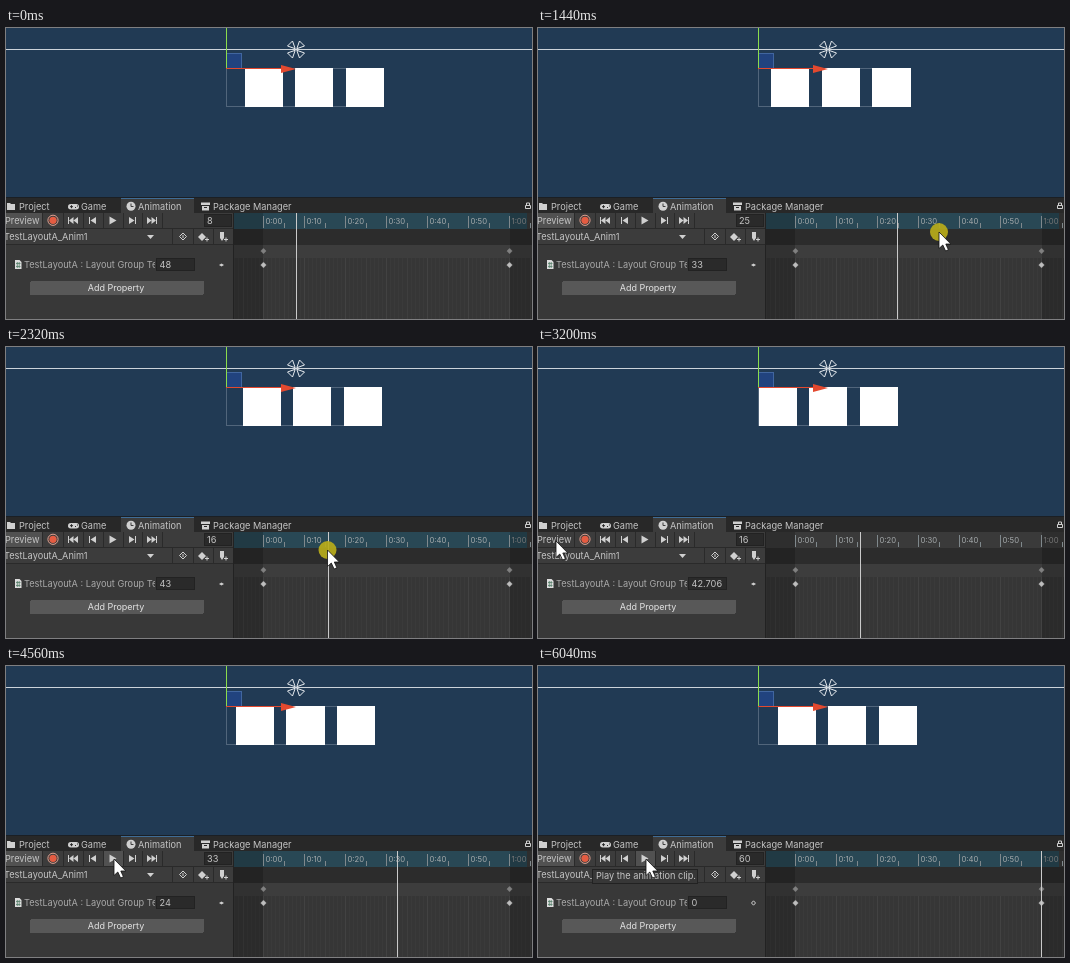
An HTML page for the animation above (6.12 s loop, 526 by 291 pixels).

```html
<!DOCTYPE html>
<html lang="en">
<head>
<meta charset="utf-8">
<title>Layout animation</title>
<style>
html, body { margin: 0; width: 100%; height: 100%; overflow: hidden; background: #213a54; }
svg { display: block; }
text { font: 9.2px Inter, Roboto, sans-serif; fill: #c4c4c4; white-space: pre; }
rect, .crisp { shape-rendering: crispEdges; }
.dim { fill: #a9a9a9; }
.ruler text { font-size: 7.7px; fill: #a6abad; }
.icon { fill: #d0d0d0; }
.line { fill: none; stroke: #d0d0d0; }
.field { fill: #2a2a2a; stroke: #222; }
</style>
</head>
<body>
<svg width="526" height="291" viewBox="0 0 526 291">
  <!-- scene view -->
  <rect width="526" height="170" fill="#213a54"/>
  <rect y="21" width="526" height="1" fill="#ccd3da"/>
  <rect id="outline" x="220.5" y="40.5" width="158" height="38" fill="none" stroke="#51657b"/>
  <g id="cubes" fill="#fff"></g>
  <rect x="220.5" y="25.5" width="15" height="15" fill="#21437f" stroke="#41669f"/>
  <rect x="220" width="1" height="41" fill="#8bdc4c"/>
  <rect x="220" y="40" width="57" height="1" fill="#e3492f"/>
  <path d="M275 37L290 41L275 45Z" fill="#e3492f"/>
  <g id="anchor" transform="translate(290 21.5)" fill="none" stroke="#e8ecf0"></g>

  <!-- tabs -->
  <rect y="169" width="526" height="122" fill="#383838"/>
  <rect y="169" width="526" height="16" fill="#282828"/>
  <rect y="169" width="526" height="1" fill="#1b1f24"/>
  <rect x="115" y="170" width="73" height="16" fill="#3c3c3c"/>
  <rect x="115" y="170" width="73" height="1" fill="#3f6c96"/>
  <path class="icon" d="M1 175h3l1 1h4v6H1z"/>
  <text x="13" y="181.5">Project</text>
  <rect class="icon" x="62" y="176" width="11" height="5.5" rx="2.7" style="shape-rendering:auto"/>
  <path d="M64 178.7h3M65.5 177.2v3M69 179.5h1M71 178h1" stroke="#282828"/>
  <text x="75" y="181.5">Game</text>
  <circle class="icon" cx="125" cy="178.3" r="4.5"/>
  <path d="M125 175.5v3h2.5" fill="none" stroke="#3c3c3c"/>
  <text x="132" y="181.5">Animation</text>
  <path class="icon" d="M195 174.5h9v2.5h-9zM196 178h7v4.5h-7z"/>
  <path d="M198 179.5h3" stroke="#282828"/>
  <text x="207" y="181.5">Package Manager</text>
  <path class="line" d="M519.5 177.5h5v3h-5zM520.5 177v-2h3v2"/>

  <!-- transport bar -->
  <rect y="185" width="228" height="31" fill="#3c3c3c"/>
  <rect id="previewBtn" y="185" width="36" height="15" fill="#515151"/>
  <rect id="playBtn" x="97" y="185" width="20" height="15" fill="#515151"/>
  <text x="-1" y="196">Preview</text>
  <circle cx="47" cy="192.3" r="5.1" fill="none" stroke="#e0a090"/>
  <circle cx="47" cy="192.3" r="3.6" fill="#e45c42"/>
  <g class="icon">
    <path d="M62 189h1v7h-1zM67.5 189v7l-4.500-3.500zM72 189v7l-4.500-3.500z"/>
    <path d="M83 189h1v7h-1zM90 189v7l-5.500-3.500z"/>
    <path d="M103.500 188.500v8l7-4z"/>
    <path d="M123 189v7l5.500-3.500zM129 189h1v7h-1z"/>
    <path d="M141 189v7l4.500-3.500zM145.500 189v7l4.500-3.500zM150 189h1v7h-1z"/>
  </g>
  <path class="crisp" d="M36.500 185v15M57.500 185v15M77.500 185v15M97.500 185v15M117.500 185v15M136.500 185v15M156.500 185v15M166.500 201v15M187.500 201v15M207.500 201v15M0 200.500h228M0 216.500h228" stroke="#2a2a2a"/>
  <rect class="field" x="198.500" y="186.500" width="27" height="12"/>
  <text id="frameLabel" x="201" y="195.500"></text>
  <text x="-2" y="212">TestLayoutA_Anim1</text>
  <path class="icon" d="M141 207h7l-3.500 4z"/>
  <path class="line" d="M177 205l3.500 3.500l-3.500 3.500l-3.500-3.500zM177 207v3"/>
  <path class="icon" d="M196 205l4 4l-4 4l-4-4zM214 204h4v6l-2 3l-2-3z"/>
  <path class="line" d="M199 211.500h4M201 209.500v4M218 211.500h4M220 209.500v4"/>

  <!-- property list -->
  <path d="M9 232h4.500l2 2v7H9z" fill="#dedede"/>
  <path d="M10 235.500h4.500M10 238.500h4.500M11.300 234v6M13.200 234v6" stroke="#56806a" stroke-width=".8"/>
  <svg width="149" height="291"><text class="dim" x="18" y="240">TestLayoutA : Layout Group Te</text></svg>
  <rect class="field" x="150.500" y="230.500" width="38" height="12"/>
  <text id="valueLabel" x="153.500" y="240"></text>
  <path id="keyDot" class="icon" d="M213 237l2.500-1.500l2.500 1.500l-2.500 1.500z"/>
  <path id="keyHere" class="line" d="M215.500 234.800l2 2.200l-2 2.200l-2-2.200z"/>
  <rect x="24" y="253" width="174" height="14" rx="2" fill="#585858"/>
  <text x="110" y="263.300" text-anchor="middle" style="fill:#e2e2e2;font-size:9px">Add Property</text>

  <!-- dope sheet -->
  <rect x="228" y="185" width="298" height="106" fill="#363636"/>
  <rect x="228" y="185" width="298" height="16" fill="#3a3a3a"/>
  <rect id="tint" x="228" y="185" width="293" height="16" fill="#294855"/>
  <rect x="228" y="201" width="298" height="16" fill="#2c2c2c"/>
  <rect x="228" y="217" width="298" height="13" fill="#3d3d3d"/>
  <g id="grid" class="crisp"></g>
  <rect x="228" y="185" width="29" height="106" fill="#000" opacity=".2"/>
  <rect x="504" y="185" width="22" height="106" fill="#000" opacity=".2"/>
  <rect x="227" y="185" width="1" height="106" fill="#222"/>
  <g id="ruler" class="ruler"></g>
  <g id="keys"></g>
  <rect id="playhead" y="185" width="1" height="106" fill="#cacaca"/>

  <g id="tooltip">
    <rect x="54.500" y="203.500" width="105" height="14" fill="#373737" stroke="#222"/>
    <text x="58" y="213">Play the animation clip.</text>
  </g>
  <g id="cursor">
    <circle id="press" r="9" fill="#b8ac1a" opacity=".92"/>
    <path d="M0 0V16.500L3.800 13L6.600 19L9.400 17.800L6.800 12H11.800Z" fill="#fff" stroke="#111" stroke-width=".8"/>
  </g>
</svg>
<script>
const LOOP = 6120, ORIGIN = 257, STEP = 4.1, PITCH = 50.6, SIZE = 38.2;
const PREVIEW_OFF = 3200, PLAY = 4240;
const $ = id => document.getElementById(id);

function add(parent, tag, attrs, label = '') {
  const el = document.createElementNS('http://www.w3.org/2000/svg', tag);
  for (const name in attrs) el.setAttribute(name, attrs[name]);
  el.textContent = label;
  return $(parent).appendChild(el);
}
const show = (id, on) => $(id).style.display = on ? '' : 'none';

const cubes = [0, 1, 2].map(() => add('cubes', 'rect', { y: 40, height: 39 }));
for (const a of [0, 90, 180, 270])
  add('anchor', 'path', { d: 'M.8 .8L8.500 3.500L3.500 8.500Z', transform: `rotate(${a})` });

for (let f = -7; f <= 65; f++) {
  const x = Math.round(ORIGIN + f * STEP);
  const major = f % 10 === 0, mid = f % 5 === 0;
  add('grid', 'rect', { x, y: 230, width: 1, height: 61, fill: '#fff', opacity: major ? .06 : mid ? .04 : .02 });
  if (mid && f >= 0) {
    const h = major ? 12 : 5;
    add('ruler', 'rect', { x, y: 200 - h, width: 1, height: h, fill: '#7f888c' });
  }
  if (major && f >= 0)
    add('ruler', 'text', { x: x + 2.5, y: 195.5, style: f === 60 ? 'fill:#777' : '' }, f === 60 ? '1:00' : '0:' + (f || '00'));
}
for (const x of [257.5, 503.5]) for (const [y, fill] of [[223, '#808080'], [237, '#bebebe']])
  add('keys', 'path', { d: `M${x} ${y - 3.2}l3.2 3.2l-3.2 3.2l-3.2-3.2z`, fill, stroke: '#2a2a2a', 'stroke-width': .5 });

// [time, x, y] of the pointer
const pointer = [
  [0, 290, 204], [160, 290, 204], [400, 281, 204], [720, 300, 204], [1000, 483, 205],
  [1240, 335, 204], [1400, 359, 204], [1440, 401, 204], [1640, 518, 204], [1760, 510, 204],
  [2000, 345, 203], [2160, 317, 203], [2280, 321.5, 203], [2400, 321.5, 203],
  [2640, 39, 216], [2920, 19, 196], [3000, 18, 194], [3200, 18, 194],
  [3440, 1, 224], [3640, 40, 269], [3800, 90, 266], [3960, 118, 240],
  [4120, 113, 210], [4200, 108, 193]
];
// [time, frames played including earlier rounds]
const playback = [[PLAY, 15.73], [4560, 32.65], [5320, 75.65], [6040, 120]];

function at(keys, t, col) {
  const i = keys.findIndex(k => k[0] > t);
  if (i === 0) return keys[0][col];
  if (i < 0) return keys[keys.length - 1][col];
  const a = keys[i - 1], b = keys[i];
  return a[col] + (b[col] - a[col]) * (t - a[0]) / (b[0] - a[0]);
}

// screen updates at 15 per second, snapped to a 40 ms grid
function tick(t) {
  const shift = t < 3300 ? 0 : 120;
  const r = (t - shift) % 200;
  return t - r + (r < 40 ? 0 : r < 120 ? 40 : 120);
}

// eased fall from 50 to 0 over 60 frames
function curve(frame) {
  const t = Math.min(1, Math.max(0, frame / 60));
  return 50 * (1 - 3 * t * t + 2 * t ** 3 + .41 * (t * t - t ** 3));
}

function draw(time) {
  const t = tick(time);
  const playing = t >= PLAY;
  const preview = t < PREVIEW_OFF || playing;
  const frame = playing
    ? at(playback, t, 1) % 60 || 60
    : (at(pointer, Math.min(t - 40, 2320), 1) - ORIGIN) / STEP;
  const padding = !preview ? 0 : curve(playing ? frame % 60 : frame);

  const left = 220.5 + padding * .38;
  cubes.forEach((cube, i) => {
    const x = Math.round(left + i * PITCH);
    cube.setAttribute('x', x);
    cube.setAttribute('width', Math.round(left + i * PITCH + SIZE) - x);
  });
  $('outline').setAttribute('width', Math.round(left + 2 * PITCH + SIZE) - 221);
  $('playhead').setAttribute('x', Math.round(ORIGIN + frame * STEP));
  $('frameLabel').textContent = Math.round(frame);
  $('valueLabel').textContent = preview ? Math.round(curve(frame)) : '42.706';

  const onKey = Math.round(frame) === 60 || Math.round(frame) === 0;
  show('keyHere', onKey);
  show('keyDot', !onKey);
  show('tint', preview);
  show('previewBtn', preview);
  show('playBtn', playing);
  show('tooltip', t >= 4640);
  show('cursor', t >= 120);
  show('press', t < 2400 || t >= 3000 && t < 3200 || t >= 4160 && t < PLAY);
  $('cursor').setAttribute('transform', `translate(${at(pointer, t, 1)} ${at(pointer, t, 2)})`);
}

let start;
function loop() {
  const now = performance.now();
  start ??= now;
  draw((now - start) % LOOP);
  requestAnimationFrame(loop);
}
draw(0);
requestAnimationFrame(loop);
</script>
</body>
</html>
```
